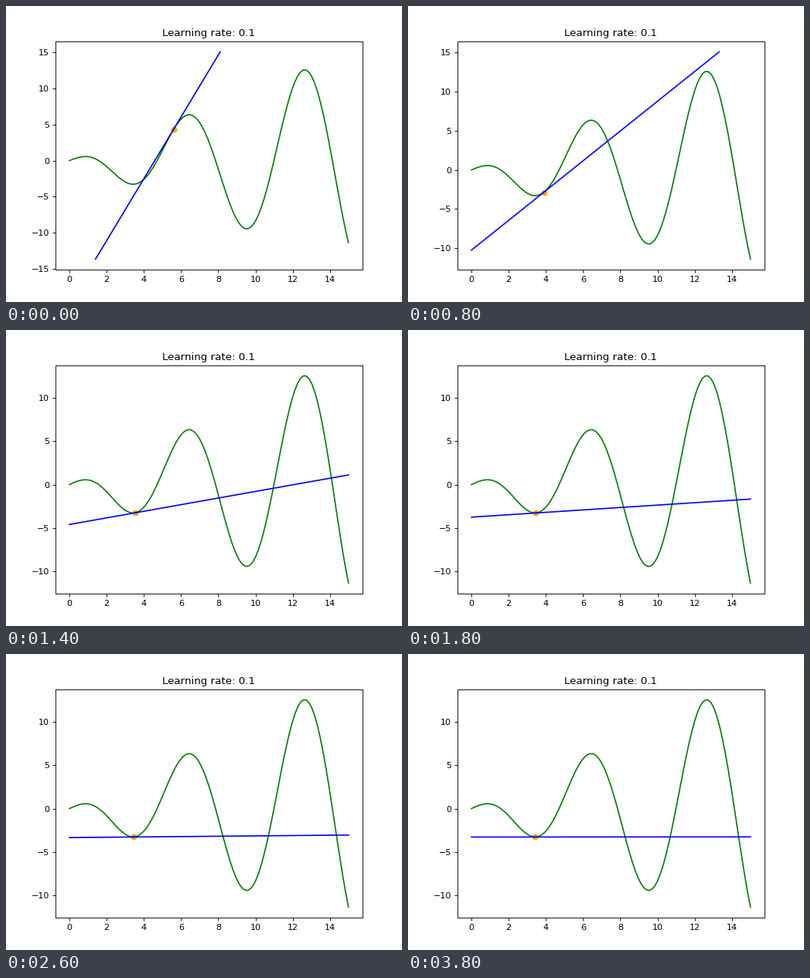
A matplotlib script that plays this animation: 512 px wide and 384 px high, repeating every 4000 ms.

```python
import numpy as np
import matplotlib.pyplot as plt
from matplotlib.animation import FuncAnimation

RATE = 0.1
START = 5.606
FRAMES = 20
INTERVAL = 200


def f(x):
    return x * np.cos(x)


def slope(x):
    return np.cos(x) - x * np.sin(x)


def descend(x, steps):
    for _ in range(steps):
        x -= RATE * slope(x)
    return x


xs = np.linspace(0, 15, 100)
ys = f(xs)
low, high = 1.2 * ys.min(), 1.2 * ys.max()

fig, ax = plt.subplots(figsize=(6.4, 4.8), dpi=80)


def tangent(x):
    """Ends of the tangent at x, cut to the domain and to low..high."""
    m, y = slope(x), f(x)
    at_low, at_high = sorted(x + (np.array([low, high]) - y) / m)
    ends = np.array([max(xs[0], at_low), min(xs[-1], at_high)])
    return ends, y + m * (ends - x)


def draw(i):
    x = descend(START, i)
    ax.clear()
    ax.set_title(f"Learning rate: {RATE}")
    ax.plot(xs, ys, color="green")
    ax.plot(*tangent(x), color="blue")
    ax.scatter([x], [f(x)], color="orange")


anim = FuncAnimation(fig, draw, frames=FRAMES, init_func=lambda: None,
                     interval=INTERVAL, repeat=True, repeat_delay=0)
plt.show()
```
